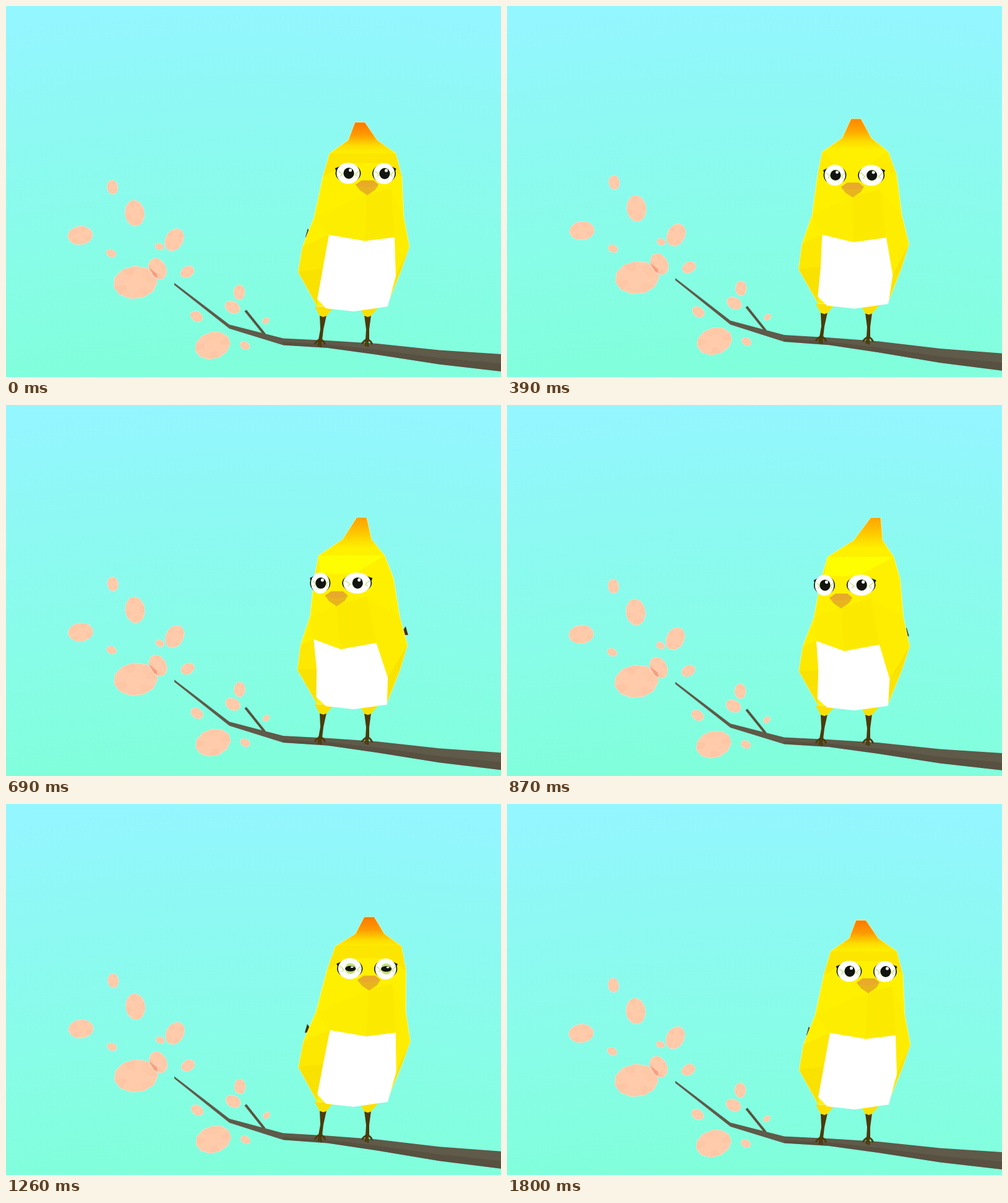
An HTML page with a canvas that plays this animation: 800x600 px, repeating every 1.83 s.

```html
<!DOCTYPE html>
<html>
<head>
<meta charset="utf-8">
<style>
html, body { margin: 0; height: 100%; overflow: hidden; background: #8cfbee; }
canvas { display: block; width: 800px; height: 600px; }
</style>
</head>
<body>
<canvas id="c" width="800" height="600"></canvas>
<script>
const g = document.getElementById('c').getContext('2d');
const LOOP = 1830, CYCLE = 1800, STEP = 30;

const ramp = (v, a, b) => Math.max(0, Math.min(1, (v - a) / (b - a)));
const bump = (t, at) => Math.exp(-(((t - at) / 75) ** 2));

// How far the branch is lifted at x; it sways most at the tip.
const swing = t => (1 - Math.cos(2 * Math.PI * t / 900)) / 2;
const lift = (x, t) => 8 * swing(t) * Math.min(1, (900 - x) / 628);

// Head shift, extra crest shift, head drop, face turn and nod, in pixels.
const keys = [
  { t: 0,    lean: 0,   tip: 0,  drop: 0,  turn: 0,   nod: 0 },
  { t: 210,  lean: 3,   tip: 0,  drop: -2, turn: 2,   nod: -2 },
  { t: 540,  lean: -25, tip: 12, drop: 6,  turn: -46, nod: 17 },
  { t: 870,  lean: -6,  tip: 30, drop: 8,  turn: -44, nod: 23 },
  { t: 1260, lean: 9,   tip: 6,  drop: -4, turn: 3,   nod: 0 },
  { t: 1530, lean: 16,  tip: 3,  drop: 9,  turn: 16,  nod: 25 }
];

// Smooth cyclic curve through the keys.
function poseAt(t) {
  const n = keys.length;
  const key = i => ({ ...keys[(i + n) % n], t: keys[(i + n) % n].t + CYCLE * Math.floor(i / n) });
  let i = n - 1;
  while (keys[i].t > t) i--;
  const [a, b, c, d] = [i - 1, i, i + 1, i + 2].map(key);
  const h = c.t - b.t, u = (t - b.t) / h, s = u * u * (3 - 2 * u), pose = {};
  for (const k in b) {
    const m = .8 * h * (c[k] - a[k]) / (c.t - a.t), q = .8 * h * (d[k] - b[k]) / (d.t - b.t);
    pose[k] = b[k] + (c[k] - b[k]) * s + u * (1 - u) * ((1 - u) * m - u * q);
  }
  return pose;
}

function poly(points, fill, line) {
  g.beginPath();
  for (const p of points) g.lineTo(...p);
  g.closePath();
  g.fillStyle = fill;
  g.fill();
  if (line) {
    g.strokeStyle = line;
    g.lineWidth = 1;
    g.stroke();
  }
}

function stroke(points, color, width) {
  g.beginPath();
  for (const p of points) g.lineTo(...p);
  g.strokeStyle = color;
  g.lineWidth = width;
  g.stroke();
}

function oval(x, y, rx, ry, fill) {
  g.beginPath();
  g.ellipse(x, y, rx, ry, 0, 0, 7);
  g.fillStyle = fill;
  g.fill();
}

function sky() {
  const f = g.createRadialGradient(400, 2600, 2000, 400, 2600, 2600);
  f.addColorStop(0, '#80ffda');
  f.addColorStop(.4, '#88fce8');
  f.addColorStop(.8, '#8ff8f6');
  f.addColorStop(1, '#94f6ff');
  g.fillStyle = f;
  g.fillRect(0, 0, 800, 600);
}

// x, y, half length, angle
const petals = [
  [172,293,11.5,1.45], [208,335,21,1.45], [120,371,20,-.1], [170,400,8,.4], [272,378,19,2.07],
  [248,389,7,.4], [293,430,11.5,-.5], [209,447,35,-.1], [245,425,18,1.07], [377,463,12,1.57],
  [366,487,12.5,.5], [308,502,10.5,.6], [420,509,6,-.7], [386,549,8,.5], [334,549,28.5,-.3]
];

function petal([x, y, size, angle], k, t) {
  const ring = s => Array.from({ length: 11 }, (_, i) => {
    const a = i * 2 * Math.PI / 11 + k;
    return [size * s * Math.cos(a), size * s * .74 * Math.sin(a)];
  });
  const edge = ring(1.02), core = ring(.5);
  g.save();
  g.translate(x + 1.3 * swing(t), y - lift(x, t));
  g.rotate(angle);
  poly(edge, '#ffcbaa', '#ffd9c2');
  edge.forEach((p, i) => {
    const j = (i + 1) % 11;
    poly([p, edge[j], core[j], core[i]], `rgba(243,165,125,${ramp(Math.sin(i * 2.3 + k), 0, 8)})`);
  });
  g.restore();
}

function blossoms(t) {
  petals.forEach((p, k) => petal(p, k, t));
  const y = 431 - lift(240, t);
  poly([[231, y - 8], [244, y + 2], [245, y + 9], [239, y + 6]], 'rgba(238,115,90,.5)');
}

// x, middle y, thickness
const spine = [[272,449.5,3.5], [361,518.5,6.5], [448,543,11], [520,547,12], [600,555,18],
  [700,568,23], [801,577,28]];

function branch(t) {
  const along = s => spine.map(([x, y, w]) => [x, y + s * w / 2 - lift(x, t)]);
  stroke([[387, 492.5 - lift(387, t)], [418, 531 - lift(418, t)]], '#59523f', 4);
  poly([...along(-1), ...along(1).reverse()], '#5f5a49');
  poly([...along(.1).slice(2), ...along(1).slice(2).reverse()], 'rgba(74,62,48,.35)');
}

function leg(x, slant, t) {
  const y = 500 - lift(x, t), foot = x + slant, brown = '#4d3a0b';
  poly([[x - 5, y], [x + 6, y], [x + slant / 2 + 3, y + 23], [foot + 3, y + 40],
    [foot - 3, y + 40], [x + slant / 2 - 2, y + 23]], brown);
  for (const d of [-9, -3, 1, 8]) {
    stroke([[foot, y + 38], [foot + d * .7, y + 43], [foot + d, y + 52 - Math.abs(d) * .6]], brown, 3);
  }
  poly([[x - 13, y - 14], [x - 5, y + 1], [x + 1, y + 3], [x + 6, y + 1], [x + 19, y - 14]], '#fae000');
}

function eye([x, y], rx, side, shut) {
  const ry = 17, open = 1 - shut, px = x + 1;
  oval(x, y, rx + 1.7, ry * .9, '#17180c');
  poly([[x - side * rx * 1.13, y - 8], [x, y - ry], [x - side * rx * .8, y + 8]], '#17180c');
  oval(x, y, rx, ry, '#fff');
  for (const s of [-1, 1]) {
    stroke([[px + s * rx * .88, y - 4], [px + s * rx * .55, y + 2], [px + s * rx * .75, y + 5]], '#cbe583', 1.4);
  }
  oval(px, y, 8.8, 9, '#c3e07a');
  oval(px, y, 8.5, 9 * open, '#121510');
  oval(px + 2.5, y - 5 * open, 2.5, 2.6 * open, '#fff');
}

// y, left edge, right edge
const rows = [[188,564,580], [217,553,600], [238,523,630], [276,512,640], [341,498,643],
  [389,479,652], [430,472,638], [486,503,615]];
const bibPoints = [[522,370], [580,380], [628,374], [630,437], [617,486], [562,494], [517,489],
  [503,474], [512,425]];

function bird(t) {
  const { lean, tip, drop, turn, nod } = poseAt(t), bob = lift(530, t);

  // The body bends more with height; the front of it turns most in the middle.
  const body = (x, y) => {
    const w = ramp(y, 490, 240) ** 2, crest = ramp(y, 240, 188);
    return [x + lean * w + tip * crest, y + drop * w * (1 - crest) - .2 * tip * crest - bob];
  };
  const face = (x, y) => {
    const w = ramp(y, 490, 350) * (1 - ((x - 580) / 90) ** 2);
    return [x + turn * w, y + nod * w - bob];
  };

  leg(512, -4, t);
  leg(584, 0, t);

  const tail = Math.tanh((turn + 18) / 8), tx = 566 - 84 * tail, ty = 374 - bob;
  poly([[tx, ty], [tx + 4 * tail, ty - 14], [tx + 14 * tail, ty]], '#41330f');

  const L = rows.map(([y, l]) => body(l, y)), R = rows.map(([y, , r]) => body(r, y));
  const top = L[0][1], f = g.createLinearGradient(0, top, 0, top + 50);
  f.addColorStop(0, `hsl(${28 + nod * .45},100%,50%)`);
  f.addColorStop(.4, `hsl(${36 + nod * .4},100%,50%)`);
  f.addColorStop(.75, '#fddc00');
  f.addColorStop(1, '#fff000');
  poly([...L, ...R.reverse()], f, 'rgba(255,248,150,.8)');
  R.reverse();

  const bib = bibPoints.map(p => face(...p));
  const [bx, by] = face(584, 288), chin = [bx, by + 16], cheek = face(622, 295);
  const brow = [face(610, 254), [bx, by - 34], face(553, 254)];
  poly([L[2], R[2], ...brow], `rgba(255,255,0,${ramp(nod, 0, 24)})`);
  poly([L[2], R[2], R[3], ...brow, L[3]], `rgba(240,190,0,${.22 * (1 - ramp(nod, 0, 18))})`);
  poly([R[4], R[5], R[6], bib[3], bib[2], cheek], 'rgba(240,205,0,.1)');
  poly([R[5], R[6], R[7], bib[4], bib[3]], 'rgba(225,180,0,.2)');
  poly([L[5], bib[0], bib[8], L[6]], 'rgba(230,180,0,.14)');
  poly([L[6], bib[8], bib[7], L[7]], 'rgba(230,175,0,.24)');
  poly([chin, cheek, bib[2], bib[1]], 'rgba(225,195,0,.14)');
  poly([L[4], chin, bib[1], bib[0]], 'rgba(235,205,0,.1)');
  poly(bib, '#fff');

  const shut = .55 * bump(t, 1235) + .45 * bump(t, 495);
  eye(face(553, 270.5), 18.8 + turn * .08, 1, shut);
  eye(face(611, 271), 17.3 - turn * .1, -1, shut);

  const at = (x, y) => [bx + x, by + y], upper = [at(-19, 1), at(-9, -6), at(10, -6), at(18, 1)];
  poly([...upper, at(13, 9), at(0, 18), at(-12, 10)], '#e8b41e');
  poly([...upper, at(5, 5), at(-8, 5)], '#e8aa2a');
}

function draw(now) {
  const t = Math.floor(now % LOOP / STEP) * STEP % CYCLE;
  sky();
  blossoms(t);
  branch(t);
  bird(t);
  requestAnimationFrame(draw);
}
draw(0);
</script>
</body>
</html>
```
